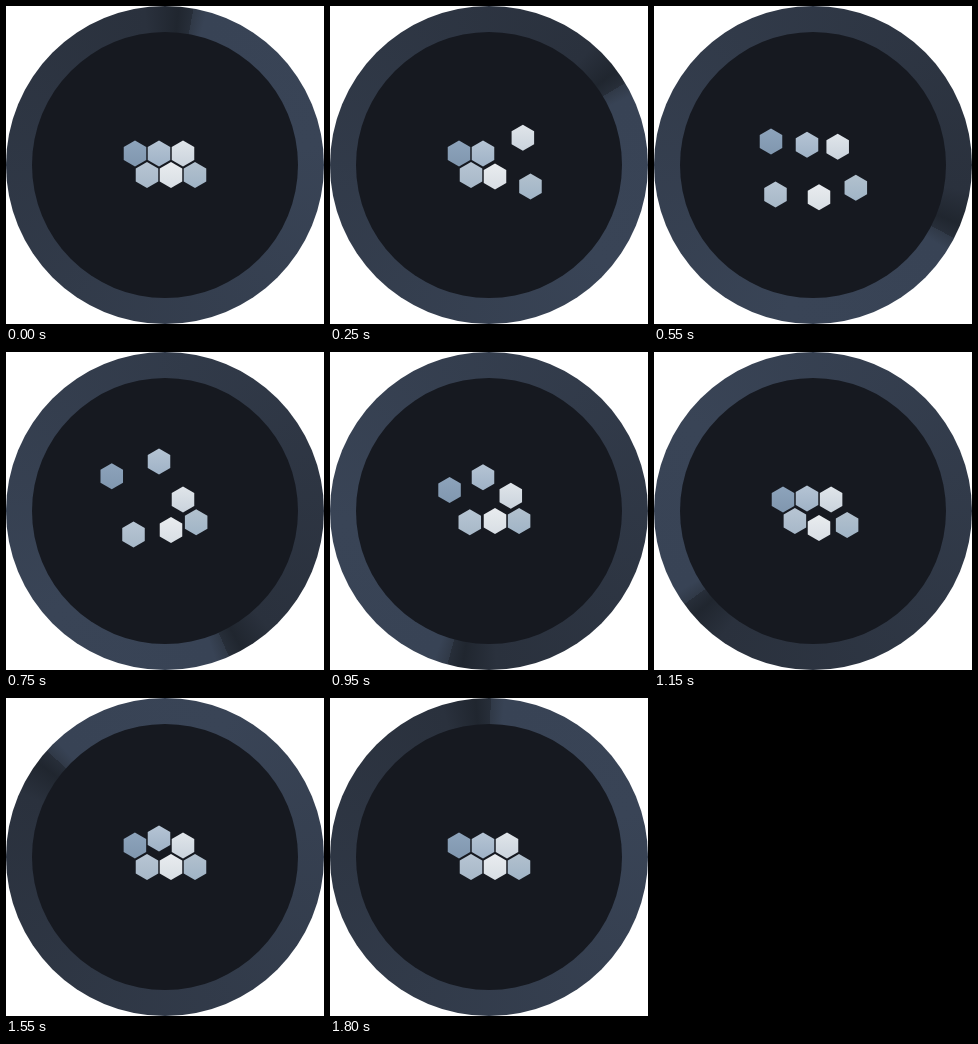
An HTML page with a canvas that plays this animation: 318x318 px, repeating every 1.85 s.

```html
<!DOCTYPE html>
<html lang="en">
<head>
<meta charset="utf-8">
<title>Hexagon loader</title>
<style>
  html, body { margin: 0; height: 100%; overflow: hidden; background: #fff; }
  canvas { display: block; }
</style>
</head>
<body>
<canvas id="stage" width="318" height="318"></canvas>
<script>
const ctx = document.getElementById('stage').getContext('2d');
const LOOP = 1850, STEP = 50, HOLD = 200, MID = 159, TAU = Math.PI * 2;

// Clockwise from top right: position, direction, push size and start, ripple size, colours
const hexes = [
  { x: 177, y: 147.5, dx: 1, dy: -1, push: 17, start: 0, ripple: 4.8, fill: ['#e0e5ea', '#cad3dc'] },
  { x: 189, y: 169, dx: 1, dy: 1, push: 19, start: 80, ripple: 5.2, fill: ['#b2c1ce', '#a0b4c6'] },
  { x: 165, y: 169, dx: 0, dy: 1, push: 23, start: 200, ripple: 9, fill: ['#e9ecef', '#d8dee4'] },
  { x: 141, y: 169, dx: -1, dy: 1, push: 20, start: 280, ripple: 5.2, fill: ['#b7c5d3', '#a7b8c8'] },
  { x: 129, y: 147.5, dx: -1, dy: -1, push: 24, start: 400, ripple: 4.4, fill: ['#8da3bb', '#8097af'] },
  { x: 153, y: 147.5, dx: 0, dy: -1, push: 38, start: 455, ripple: 9, fill: ['#b5c4d4', '#9fb2c6'] }
];

// Smooth rise to 1 at the peak and smooth fall back to 0
function pulse(t, peak, rise, fall) {
  const p = (t - peak) / (t < peak ? rise : fall);
  return Math.abs(p) < 1 ? (1 + Math.cos(Math.PI * p)) / 2 : 0;
}

function disc(radius, fill) {
  ctx.beginPath();
  ctx.arc(MID, MID, radius, 0, TAU);
  ctx.fillStyle = fill;
  ctx.fill();
}

function drawRing(t) {
  const shade = ctx.createConicGradient(t / LOOP * TAU - TAU / 4 + 0.18, MID, MID);
  shade.addColorStop(0, '#303947');
  shade.addColorStop(0.014, '#384355');
  shade.addColorStop(0.2, '#394456');
  shade.addColorStop(0.95, '#2a313d');
  shade.addColorStop(0.985, '#20262f');
  shade.addColorStop(1, '#272e39');
  disc(159, shade);
  disc(133, '#161920');
}

function drawHex(hex, i, t) {
  const shift = hex.push * pulse(t, hex.start + 300, 300, 440)
    + hex.ripple * pulse(t, 1000 + 100 * i, 165, 165);
  const x = hex.x + hex.dx * shift, y = hex.y + hex.dy * shift, r = 13;
  const fill = ctx.createLinearGradient(0, y - r, 0, y + r);
  hex.fill.forEach((color, n) => fill.addColorStop(n, color));
  ctx.beginPath();
  for (let k = 0; k < 6; k++) {
    const a = k * TAU / 6;
    ctx.lineTo(x + r * Math.sin(a), y - r * Math.cos(a));
  }
  ctx.fillStyle = fill;
  ctx.fill();
}

function draw(now) {
  const time = now % LOOP;
  const t = time < HOLD ? 0 : Math.floor(time / STEP) * STEP;
  ctx.clearRect(0, 0, 318, 318);
  drawRing(t);
  hexes.forEach((hex, i) => drawHex(hex, i, t));
}

const begin = performance.now();
function frame() {
  draw(performance.now() - begin);
  requestAnimationFrame(frame);
}
frame();
</script>
</body>
</html>
```
